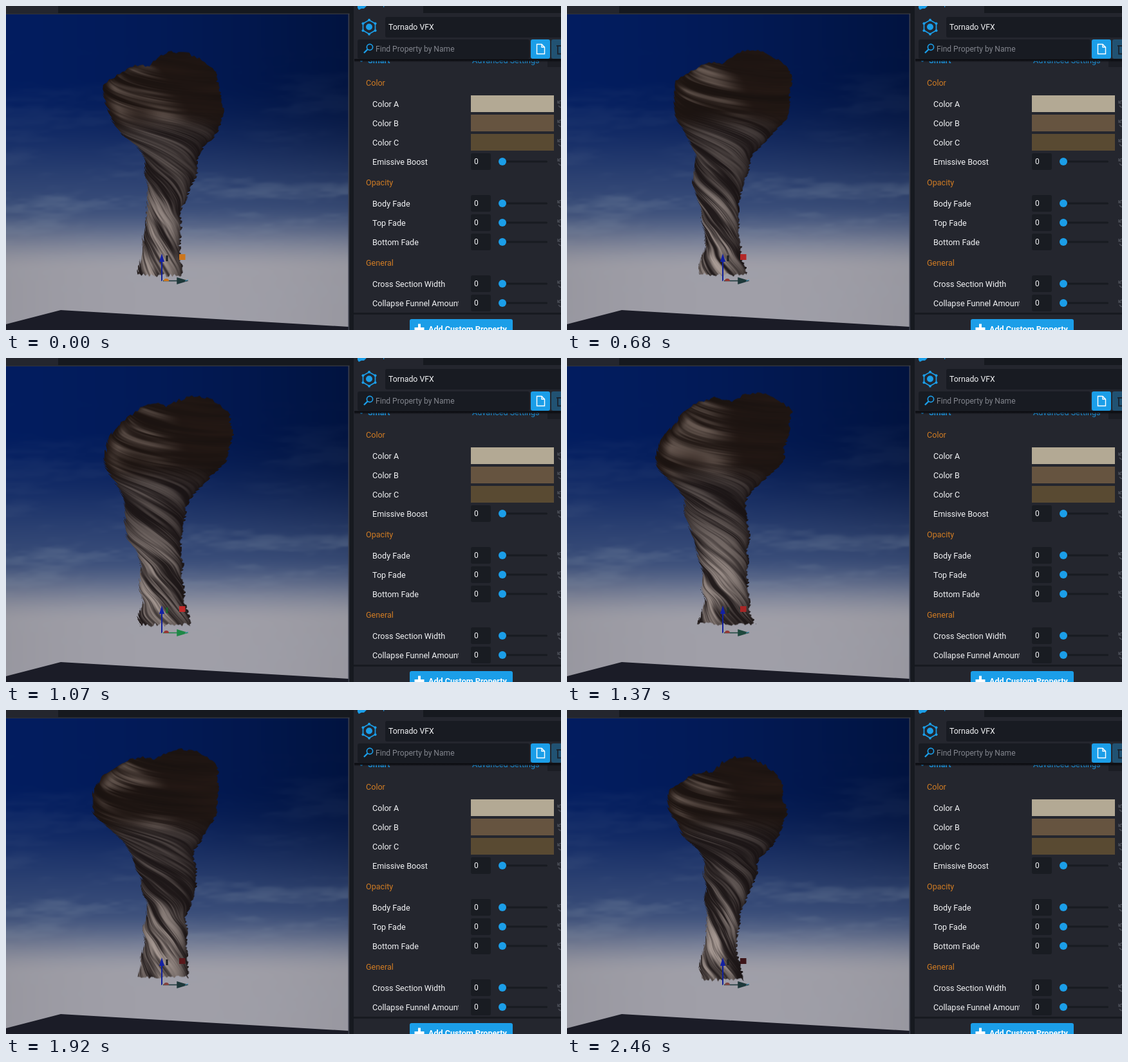
These frames come from a looping animation (862 px wide and 504 px high, 2.54 s). An HTML page with a canvas:

```html
<!DOCTYPE html>
<html lang="en">
<head>
<meta charset="utf-8">
<title>Tornado VFX</title>
<style>
html, body { margin: 0; width: 100%; height: 100%; overflow: hidden; background: #16191f; }
canvas, svg { position: absolute; left: 0; top: 0; display: block; }
#sky { top: 13px; }
#funnel { left: 120px; top: 40px; }
text { font-family: Roboto, sans-serif; font-size: 12.6px; fill: #f2f3f5; }
.head { fill: #d07c24; }
.tab { fill: #1b8fd6; }
</style>
</head>
<body>
<canvas id="sky" width="532" height="491"></canvas>
<canvas id="funnel" width="250" height="392"></canvas>
<svg width="862" height="504" viewBox="0 0 862 504">
  <defs>
    <clipPath id="labels"><rect x="541" y="86" width="162" height="391"/></clipPath>
    <clipPath id="tabs"><rect x="541" y="85" width="321" height="12"/></clipPath>
    <linearGradient id="shade" x1="0" y1="0" x2="0" y2="1">
      <stop offset="0.3" stop-color="#0b0c10"/><stop offset="1" stop-color="#0b0c10" stop-opacity="0"/>
    </linearGradient>
  </defs>
  <path d="M0 495L85 473L532 499V504H0Z" fill="#1b1c27"/>
  <rect width="540" height="12" fill="#16191f"/>
  <rect width="81" height="11" fill="#24262e"/>
  <rect y="11.500" width="534" height="1.500" fill="#30343f"/>
  <rect x="531.500" y="12" width="2" height="492" fill="#3a3e4b"/>
  <rect x="533.500" width="7" height="504" fill="#16191f"/>

  <path d="M242 428V398" stroke="#10209c" stroke-width="2"/>
  <path d="M242 385L246 398H238Z" fill="#1220a4"/>
  <path d="M242 427.500H283" stroke="#8a94a0" stroke-width="1.500"/>
  <path id="axis" d="M244 427.500H267M266 423L281 427.500L266 432Z" stroke-width="1.500"/>
  <rect id="block" x="269" y="386" width="9.500" height="9"/>
  <rect id="mark" x="248.500" y="388" width="3" height="9"/>
  <path id="ball" d="M245 428A4 4 0 1 1 253 428Z"/>
  <path d="M278 428L283 425.500" stroke="#4f9bc4"/>

  <rect x="540" width="322" height="504" fill="#24262e"/>
  <rect x="648" width="214" height="11" fill="#16191f"/>
  <path d="M546 0H560L556 4H552L548 6L546 3Z" fill="#1b9ee8"/>
  <text x="566" y="-1" class="tab">Properties</text>

  <g fill="#1b9ee8">
    <path d="M564 22L573.500 27.200V38L564 43.500L554.500 38V27.200Z" fill="none" stroke="#1b9ee8" stroke-width="1.700"/>
    <circle cx="564" cy="32.500" r="5"/>
    <g id="nodes"></g>
  </g>
  <path d="M862 17H592a3 3 0 0 0-3 3V46a3 3 0 0 0 3 3H862Z" fill="#181b22"/>
  <text x="594" y="37" style="font-size:12.3px">Tornado VFX</text>

  <g clip-path="url(#tabs)">
    <rect x="841" y="84" width="21" height="11" fill="#1b1d24"/>
    <circle cx="552" cy="85" r="2" fill="#1b8fd6"/>
    <text x="562" y="89" class="tab" font-weight="700">Smart</text>
    <text x="724" y="89" class="tab">Advanced Settings</text>
  </g>
  <rect x="541" y="82.500" width="321" height="5" fill="url(#shade)"/>
  <rect x="546" y="52" width="267" height="30" rx="3" fill="#181b22"/>
  <g fill="none" stroke="#1b9ee8" stroke-width="1.700">
    <circle cx="565" cy="64" r="4.600"/><path d="M561.500 67.500L556 73" stroke-width="2.400"/>
  </g>
  <text x="574" y="71" style="font-size:12.1px;fill:#82858d">Find Property by Name</text>
  <rect x="815" y="52" width="30" height="30" rx="3" fill="#1b9ee8"/>
  <path d="M824.500 59.500H832L836.500 64V74.500H824.500ZM832 59.500V64H836.500" fill="none" stroke="#fff" stroke-width="1.400"/>
  <path d="M862 52H850a3 3 0 0 0-3 3V79a3 3 0 0 0 3 3H862Z" fill="#215272"/>
  <path d="M855 62H862M857 62V74.500H862" fill="none" stroke="#1a2430" stroke-width="1.800"/>

  <g id="rows"></g>

  <rect x="540" y="477" width="322" height="3" fill="#171a20"/>
  <rect x="627" y="487" width="160" height="30" rx="3" fill="#1b9ee8"/>
  <path d="M642 494.500V509M634.500 502H649.500" stroke="#fff" stroke-width="4"/>
  <text x="656" y="507" font-weight="700" style="fill:#fff">Add Custom Property</text>
</svg>
<script>
const $ = id => document.getElementById(id);
const LOOP = 2540, STEPS = 33;

// ---- property panel ----
const label = (y, s) => `<text x="569" y="${y + 5}" clip-path="url(#labels)">${s}</text>`;
const head = (y, s) => `<text class="head" x="559" y="${y + 5}">${s}</text>`;
const reset = y => `<path d="M857 ${y - 5}V${y - 1}H861M857 ${y - 1}Q859 ${y - 5} 864 ${y - 5}M858 ${y + 3}Q860 ${y + 6} 864 ${y + 6}" fill="none" stroke="#4a4d56" stroke-width="1.400"/>`;
const swatch = (y, s, c) => label(y, s) + reset(y) + `<rect x="722" y="${y - 13}" width="129" height="26" fill="${c}"/>`;
const slider = (y, s) => label(y, s) + reset(y) +
  `<rect x="722" y="${y - 13}" width="31" height="26" rx="3" fill="#191c22"/><text x="727" y="${y + 4}" style="font-size:12px">0</text>` +
  `<rect x="770" y="${y - 1.5}" width="71" height="3" rx="1.500" fill="#181b21"/><circle cx="771" cy="${y}" r="6" fill="#1b9ee8"/>`;
const group = (y, title, row, items) =>
  head(y, title) + items.map((it, i) => row(y + 33 + 30 * i, ...[].concat(it))).join('');
$('rows').innerHTML =
  group(119, 'Color', swatch, [['Color A', '#b3a994'], ['Color B', '#665440'], ['Color C', '#594a32']]) +
  slider(242, 'Emissive Boost') +
  group(274, 'Opacity', slider, ['Body Fade', 'Top Fade', 'Bottom Fade']) +
  group(399, 'General', slider, ['Cross Section Width', 'Collapse Funnel Amount']);
for (let i = 0; i < 6; i++) {
  const a = i * Math.PI / 3 + Math.PI / 2;
  $('nodes').innerHTML += `<circle cx="${564 + 11 * Math.cos(a)}" cy="${32.7 + 11 * Math.sin(a)}" r="2"/>`;
}

// ---- helpers ----
const clamp = (v, a = 0, b = 1) => Math.min(b, Math.max(a, v));
const lerp = (a, b, f) => a + (b - a) * f;
const mix = (a, b, f) => a.map((v, i) => lerp(v, b[i], f));
const ease = (a, b, v) => { const f = clamp((v - a) / (b - a)); return f * f * (3 - 2 * f); };
const bell = (v, mid, size) => Math.exp(-(((v - mid) / size) ** 2));
function hash(x, y) {
  let n = Math.imul(x, 374761393) + Math.imul(y, 668265263);
  n = Math.imul(n ^ n >>> 13, 1274126177);
  return ((n ^ n >>> 16) >>> 0) / 4294967296;
}
function noise(x, y) {
  const i = Math.floor(x), j = Math.floor(y);
  let f = x - i, g = y - j;
  f *= f * (3 - 2 * f);
  g *= g * (3 - 2 * g);
  return lerp(lerp(hash(i, j), hash(i + 1, j), f), lerp(hash(i, j + 1), hash(i + 1, j + 1), f), g);
}
function paint(cv, pixel) {
  const ctx = cv.getContext('2d'), img = ctx.createImageData(cv.width, cv.height);
  pixel(img.data, cv.width, cv.height);
  ctx.putImageData(img, 0, 0);
}

// ---- sky ----
paint($('sky'), (d, w, h) => {
  const zenith = [2, 30, 100], low = [62, 82, 126], haze = [160, 159, 168];
  for (let j = 0, k = 0; j < h; j++) {
    const y = j + 13;
    const base = mix(mix(zenith, low, ease(110, 350, y)), haze, ease(305, 412, y));
    const band = .06 + .2 * bell(y, 310, 45);
    for (let x = 0; x < w; x++, k += 4) {
      const px = x + y * .5;
      const n = .55 * noise(px / 110, y / 22) + .3 * noise(px / 45 + 9, y / 9) + .15 * noise(px / 16, y / 5 + 30);
      const cloud = band * ease(.4, .85, n) * ease(60, 150, y);
      const dim = 1 - .32 * (x / w) * (1 - ease(120, 380, y)) - .2 * (x / w - .5) ** 2;
      for (let c = 0; c < 3; c++) d[k + c] = lerp(base[c] * dim, 150 + 14 * c, cloud);
      d[k + 3] = 255;
    }
  }
});

// ---- funnel: a tapering column swayed by a wave that climbs it ----
const WAVE = 2 * Math.PI / 2.3, SPIN = 2 * WAVE;
const breath = t => Math.cos(WAVE * (t - 1.4));
function center(y, t) {
  const sway = lerp(13, 4, ease(265, 340, y));
  return 243 + 11 * (1 - ease(80, 140, y)) + sway * Math.cos(WAVE * (t - .85 + .0062 * (y - 100)));
}
function width(y, t) {
  const base = 64 + 28 * (1 - ease(240, 330, y)) + 100 * (1 - ease(150, 240, y))
    + 14 * ease(370, 412, y) - 25 * (1 - ease(85, 135, y));
  return base + breath(t) * (10 - 20 * bell(y, 205, 30));
}
// front lip on the left, taller back lobe on the right
function rim(u, t) {
  const lip = 77 - 17 * breath(t) + 330 * (u - .3) ** 2;
  const lobe = 62 - 9 * breath(t) + 260 * (u - .66) ** 2;
  return [lip, Math.min(lip, lobe)];
}

function drawFunnel(t) {
  paint($('funnel'), (d, w, h) => {
    const foot = 418 - 3 * breath(t);
    for (let j = 0; j < h; j++) {
      const y = j + 40, mid = center(y, t), half = width(y, t) / 2;
      const l = mid - half + 7 * noise(y / 20 + t * 7, 3) - 4;
      const r = mid + half - 7 * noise(y / 20 + t * 7, 60) + 4;
      const glow = .4 + .5 * ease(230, 370, y), twist = 8 * Math.log(y);
      for (let x = Math.max(120, Math.ceil(l)); x < Math.min(r, 369); x++) {
        const u = (x - l) / (r - l), th = Math.asin(clamp(2 * u - 1, -1, 1));
        const [lip, top] = rim(u, t);
        if (y < top - 2 || y > foot + 3) continue;

        // wide rings in the bowl, steep twisted strands below
        const c = y - 15 * th - 18 * Math.cos(th), turn = th * .7 - SPIN * t * .5;
        const ring = .55 * noise(c / 13 + t * 3, turn) + .28 * noise(c / 5, turn * 1.3 + 40) + .17 * noise(c / 2, turn * 2 + 80);
        const q = th - twist - SPIN * t;
        const strand = .5 * noise(q * 2.4, y / 70) + .3 * noise(q * 7, y / 40 + 20) + .2 * noise(q * 18, y / 25 + 60);

        const bowl = 1 - ease(172, 216, y + 14 * Math.cos(th));
        const front = (1 - ease(.3, .62, u - (y - 120) / 400)) * ease(0, .12, u) * ease(lip - 4, lip + 8, y);
        const hollow = 1 - .7 * bell(u, .27, .18) * bell(y, 168, 24);
        const up = .04 * ring + .42 * front * hollow * ease(.38, .8, ring);
        const round = .12 + .88 * Math.pow(Math.max(0, Math.cos(th + .3)), .9);
        const down = glow * round * (.08 + .92 * ease(.26, .76, strand));
        const b = lerp(down, up, bowl);

        const gap = Math.min(x - l, r - x) - 5 * noise(c / 2.5, t * 9);
        const lid = y - top - 5 * noise(x / 4, t * 9 + 7);
        const hem = foot - y - 6 * noise(x / 3, t * 9 + 3);
        const k = (j * w + x - 120) * 4;
        d[k] = lerp(23, 184, b) + 8 * bowl * ring;
        d[k + 1] = lerp(17, 170, b) + 2 * bowl * ring;
        d[k + 2] = lerp(18, 163, b) - 3 * bowl;
        d[k + 3] = 255 * clamp(Math.min(gap, lid, hem) / 2 + 1);
      }
    }
  });
}

// ---- gizmo handles glow and dim; one starts highlighted ----
function tint(id, a, b, f) {
  const rgb = `rgb(${mix(a, b, f).map(Math.round)})`;
  $(id).setAttribute('fill', rgb);
  if (id === 'axis') $(id).setAttribute('stroke', rgb);
}
function drawGizmo(t) {
  const green = Math.cos(Math.PI * (t - .3) / .617) ** 2;
  const red = .5 + .5 * Math.cos(2 * Math.PI * (t - .9) / 2.8);
  const hot = t < .07 ? 1 : 0, amber = [204, 118, 28];
  tint('axis', [30, 56, 58], [31, 152, 74], green);
  tint('mark', [28, 32, 34], [30, 116, 48], green);
  tint('block', mix([56, 20, 24], [194, 42, 42], red), amber, hot);
  tint('ball', mix([124, 70, 64], [150, 54, 50], red), amber, hot);
}

let shown = -1;
function tick(now) {
  const step = Math.min(STEPS - 1, Math.floor((now % LOOP + 3) * STEPS / LOOP));
  if (step !== shown) {
    shown = step;
    const t = step * LOOP / STEPS / 1000;
    drawFunnel(t);
    drawGizmo(t);
  }
  requestAnimationFrame(tick);
}
tick(performance.now());
</script>
</body>
</html>
```
